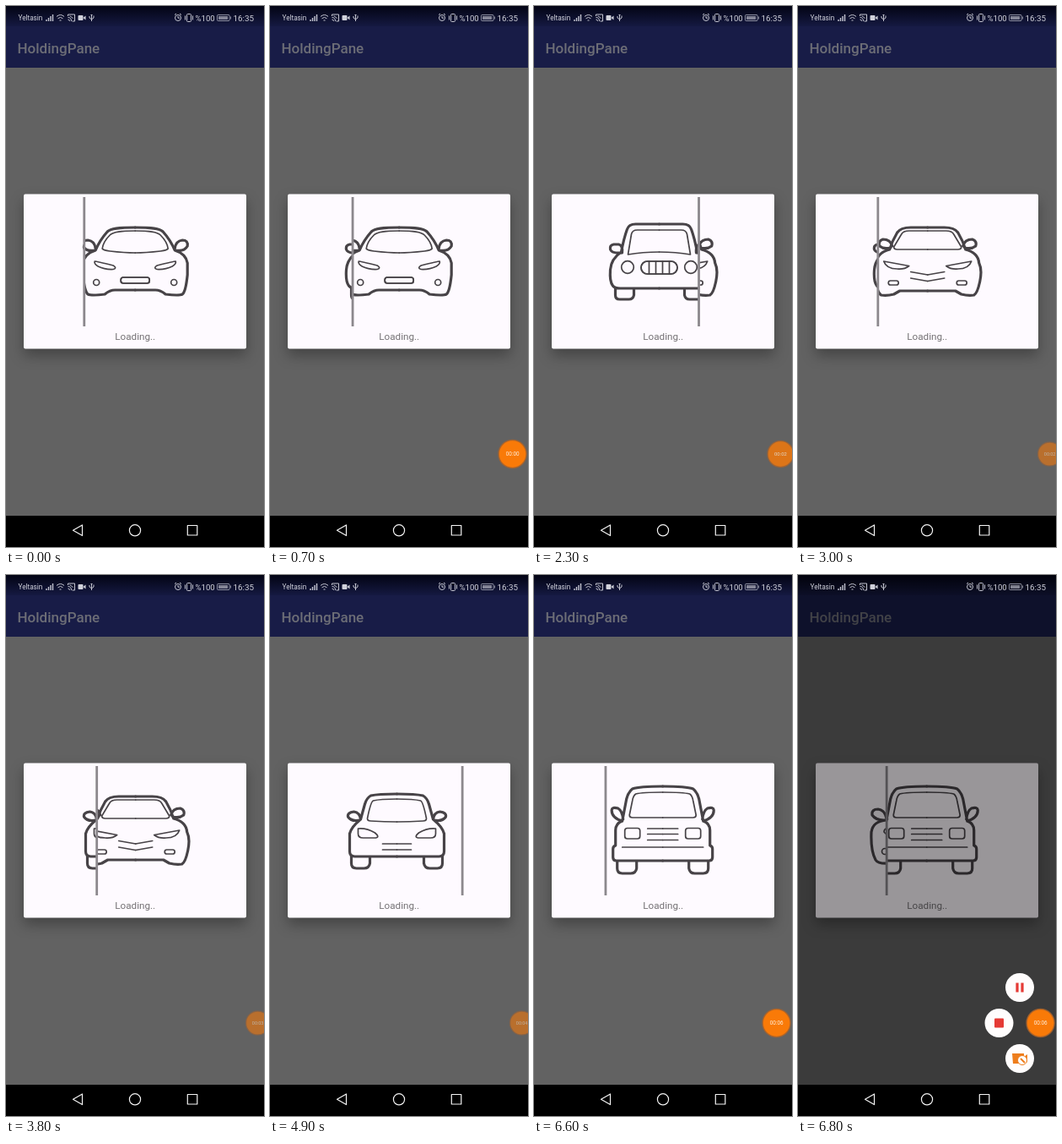
Write an HTML page that moves like this. It is 306 by 640 pixels and loops after 6900 ms.

```html
<!DOCTYPE html>
<html lang="en">
<head>
<meta charset="utf-8">
<title>Loading dialog</title>
<style>
  html, body { margin: 0; width: 100%; height: 100%; overflow: hidden; background: #626262; }
  svg { display: block; width: 306px; height: 640px; font-family: Roboto, "Open Sans", sans-serif; }
  .card { filter: drop-shadow(0 8px 8px rgba(0, 0, 0, .3)); }
  .bold, .thin { fill: none; stroke: #474347; stroke-linejoin: round; stroke-linecap: round; }
  .bold { stroke-width: 3.2; }
  .thin { stroke-width: 1.7; }
  .icon { fill: none; stroke: #c4c5d0; stroke-width: 1; }
  .status { fill: #d0d1da; }
  .nav { fill: none; stroke: #f4f4f4; stroke-width: 1.2; stroke-linejoin: round; }
</style>
</head>
<body>
<svg viewBox="0 0 306 640">
  <defs id="defs">
    <clipPath id="clipL"><rect id="boxL" x="0" y="224" height="157"/></clipPath>
    <clipPath id="clipR"><rect id="boxR" y="224" width="306" height="157"/></clipPath>
    <linearGradient id="top" x2="0" y2="1">
      <stop stop-color="#030414"/><stop offset="1" stop-color="#151941"/>
    </linearGradient>
  </defs>

  <rect width="306" height="640" fill="#626262"/>
  <rect width="306" height="73" fill="#181c47"/>
  <rect width="306" height="24" fill="url(#top)"/>
  <text x="13.500" y="55.500" font-size="17" font-weight="500" fill="#6c6d76">HoldingPane</text>

  <rect class="card" x="21" y="222.500" width="264" height="183" rx="2" fill="#fefaff"/>
  <g clip-path="url(#clipL)"><use id="carL"/></g>
  <g clip-path="url(#clipR)"><use id="carR"/></g>
  <rect id="line" y="226" width="2.800" height="153" fill="#8c888d"/>
  <text x="153.200" y="395" font-size="11.700" text-anchor="middle" fill="#757275">Loading..</text>

  <rect id="dim" width="306" height="603"/>

  <g class="status">
    <text x="14.500" y="17" font-size="8.200">Yeltasin</text>
    <text x="224.500" y="17.500" font-size="9.600">%100</text>
    <text x="269.500" y="17.500" font-size="9.800">16:35</text>
    <rect x="85.500" y="11" width="6" height="6" rx="1"/>
    <path d="M91.500 14l3-2.500v5z"/>
    <rect x="252" y="12" width="11" height="4" opacity=".6"/>
  </g>
  <g class="icon">
    <g transform="translate(-.5 0)">
      <path d="M48.500 18v-2M51 18v-4M53.500 18v-6M56 18v-8" stroke-width="1.400"/>
      <path d="M60.500 12.500Q65 8.500 69.500 12.500M62 14.800Q65 12 68 14.800M64 17h2"/>
      <path d="M74 12v-2h8v8h-3M74 13.500q4 0 4 4.500M74 16q2 0 2 2M76 11.500l4 3"/>
      <path d="M102 18v-8M99.500 12v2l2.500 2M104.500 11.500v2.500l-2.500 2M101 10.500h2"/>
    </g>
    <circle cx="204" cy="14" r="3.500"/>
    <path d="M204 12v2.200h2M200 10.500l2-1.500M208 10.500l-2-1.500"/>
    <rect x="214.500" y="9.500" width="5" height="9" rx="1"/>
    <path d="M212.500 11.500v5M221.500 11.500v5"/>
    <path d="M251.500 10.500H264Q265 10.500 265 11.500V16.500Q265 17.500 264 17.500H251.500Q250.500 17.500 250.500 16.500V11.500Q250.500 10.500 251.500 10.500M266.500 12.500v3" opacity=".7"/>
  </g>

  <rect y="603" width="306" height="37"/>
  <g class="nav">
    <path d="M79.500 620.300L90.500 614V626.600Z"/>
    <circle cx="153" cy="620.300" r="6.600"/>
    <rect x="215.300" y="614.500" width="11.500" height="11.500"/>
  </g>

  <g id="menu">
    <g data-pos="263,488">
      <circle r="17" fill="#fffdfd"/>
      <path d="M-3-5.500V5.500M3-5.500V5.500" stroke="#e53a35" stroke-width="3.200"/>
    </g>
    <g data-pos="238.500,530">
      <circle r="17" fill="#fffdfd"/>
      <rect x="-5.500" y="-5.500" width="11" height="11" rx="1" fill="#e53a35"/>
    </g>
    <g data-pos="263,572">
      <circle r="17" fill="#fffdfd"/>
      <path d="M-9-6L5-6V6H-8ZM5-2L9-5V5Z" fill="#ee7d1c"/>
      <circle cx="3" cy="2" r="5.500" fill="#fff" stroke="#ee7d1c"/>
      <path d="M1 0L6 5" stroke="#ee7d1c" stroke-width="2"/>
    </g>
  </g>
  <g id="timer">
    <circle r="16.500" fill="#f97a08" stroke="#a5622e" stroke-opacity=".8" stroke-width="1.600"/>
    <text id="clock" y="2.300" font-size="6.400" text-anchor="middle" fill="#fff0df"></text>
  </g>
</svg>
<script>
const LOOP = 6900, STEP = 100, SWEEP = 1510, FIRST_TURN = 325;
const $ = id => document.getElementById(id);
const clamp = v => Math.max(0, Math.min(1, v));
const set = (id, attrs) => {
  for (const k in attrs) $(id).setAttribute(k, attrs[k]);
};

// Each car is one half, measured from its centre line, plus its mirror image.
const path = (kind, d) => `<path class="${kind}" d="${d}"/>`;
const ring = (x, y, r) => `<circle class="thin" cx="${x}" cy="${y}" r="${r}"/>`;
const box = (x, y, w, h, r) =>
  `<rect class="thin" x="${x}" y="${y}" width="${w}" height="${h}" rx="${r}"/>`;

function car(id, centre, bold, thin, extra = '') {
  const half = path('bold', bold) + path('thin', thin) + extra;
  $('defs').insertAdjacentHTML('beforeend',
    `<g id="${id}" transform="translate(${centre} 0)">${half}<g transform="scale(-1 1)">${half}</g></g>`);
}

car('sport', 153.2,
  'M0 262C20 262 29 263 33 267Q42 277 47 289Q60 293 62 304V318Q60 338 56 341Q52 343 36 341Q30 336 24 336H0' +
  'M47 287Q48 278 56 277Q63 277 62 284Q58 291 48 289',
  'M0 266C17 266 26 267 30 271Q38 279 39 287Q38 289 30 290Q12 292 0 292' +
  'M48 302Q46 302 26 307Q21 310 26 311.5Q36 312 44 308Q49 305 48 302Z',
  ring(46, 327, 3.5) + box(-17, 321, 34, 7, 3));

car('classic', 148.5,
  'M0 258H28Q36 258 38 264Q42 275 45 291Q57 299 58 312Q59 326 55 331Q53 334 46 334H0' +
  'M44 292Q43 283 48 282H54Q59 283 58 288Q56 293 44 292' +
  'M52 334V342Q52 347 47 347H36Q31 347 30 342V334',
  'M0 265H26Q32 265 33 270L37 294Q20 291 0 291M4 302V317M12 302V317',
  ring(37.5, 309, 7.3) + box(-21.5, 302, 43, 15, 7.5));

car('coupe', 153.7,
  'M0 262H20Q32 262 36 268Q42 278 45 288Q60 292 61 304Q65 312 62 326Q59 340 55 342Q48 343 40 341L33 337H0' +
  'M42 284Q44 276 53 276Q59 278 57 284Q52 288 44 286',
  'M0 266H22Q29 266 31 270L40 285Q40 288 36 288H0' +
  'M52 302L22 307.5Q28 312 36 311Q49 311 52 302ZM0 318L20 314.5M0 325.500L20 322',
  box(34.5, 325, 12, 5, 2.5));

car('sedan', 150.5,
  'M0 259Q22 259 31 261Q36 264 38 271L43 289Q54 298 56 306V327Q56 333 50 333H0' +
  'M43 289Q44 281 51 280Q59 281 58 286Q54 292 44 290' +
  'M54 333V341Q54 347 48 347H39Q33 347 32 341V333',
  'M0 265Q20 265 28 267Q31 268 35 288Q35 291 31 291Q15 292 0 292' +
  'M46 300Q36 299 26 305Q20 310 25 311H40Q46 311 46 306ZM0 318H17M0 325H17');

car('jeep', 152.7,
  'M0 250Q28 250 36 253Q41 257 43 265L48 291Q56 294 56 302V320Q59 321 59 324V334Q59 338 55 338H0' +
  'M47 289Q48 279 53 276Q60 274 60.500 278Q61 287 48 291' +
  'M54 338V347Q54 353 48 353H38Q32 353 31 347V338',
  'M0 257Q24 257 32 259Q35 261 36 267L39.500 284Q39.500 287 36 287H0M0 300H18M0 306.500H18M0 313.500H18M0 322H48',
  box(27, 299.5, 18, 12.5, 3));

car('roadster', 153,
  'M0 262C20 262 29 263 34 268Q42 277 48 290Q64 291 66 304Q67 326 61 337Q58 342 45 341H0' +
  'M48 288Q50 278 58 277Q66 277 65 284Q60 291 49 290',
  'M0 266C17 266 25 267 28 270Q35 277 38 287Q20 292 0 292M44 299Q51 299 51 304L47 308H36Q32 300 44 299Z',
  ring(50, 327, 3.5));

const lefts = ['sedan', 'classic', 'sedan', 'roadster'];
const rights = ['sport', 'coupe', 'jeep'];

// The line swings to and fro: rightward turns swap the left car, leftward turns the right one.
function drawSweep(t) {
  const u = (t - FIRST_TURN) / SWEEP;
  const n = Math.floor(u);
  const x = 76 + 152.5 * (1 - Math.cos(Math.PI * u)) / 2;
  set('carL', { href: '#' + lefts[Math.floor(n / 2) + 1] });
  set('carR', { href: '#' + rights[Math.floor((n + 1) / 2)] });
  set('boxL', { width: x });
  set('boxR', { x });
  set('line', { x: x - 1.4 });
}

function drawRecorder(t) {
  const tuck = clamp((t - 2190) / 250) - clamp((t - 5300) / 300);
  const open = clamp((t - 6600) / 200);
  set('timer', {
    transform: `translate(${287.6 + 11 * tuck} 530) scale(${1 - 0.15 * tuck})`,
    opacity: t < 300 ? 0 : 1 - 0.42 * tuck
  });
  $('clock').textContent = '00:0' + Math.max(0, Math.floor((t - 100) / 1000));
  set('dim', { opacity: 0.4 * open });
  set('menu', { opacity: open });
  for (const item of $('menu').children) {
    const [x, y] = item.dataset.pos.split(',').map(Number);
    item.setAttribute('transform',
      `translate(${287 + (x - 287) * open} ${530 + (y - 530) * open}) scale(${open})`);
  }
}

function frame(now) {
  const t = Math.floor(now % LOOP / STEP) * STEP;
  drawSweep(t);
  drawRecorder(t);
  requestAnimationFrame(frame);
}
frame(0);
</script>
</body>
</html>
```
